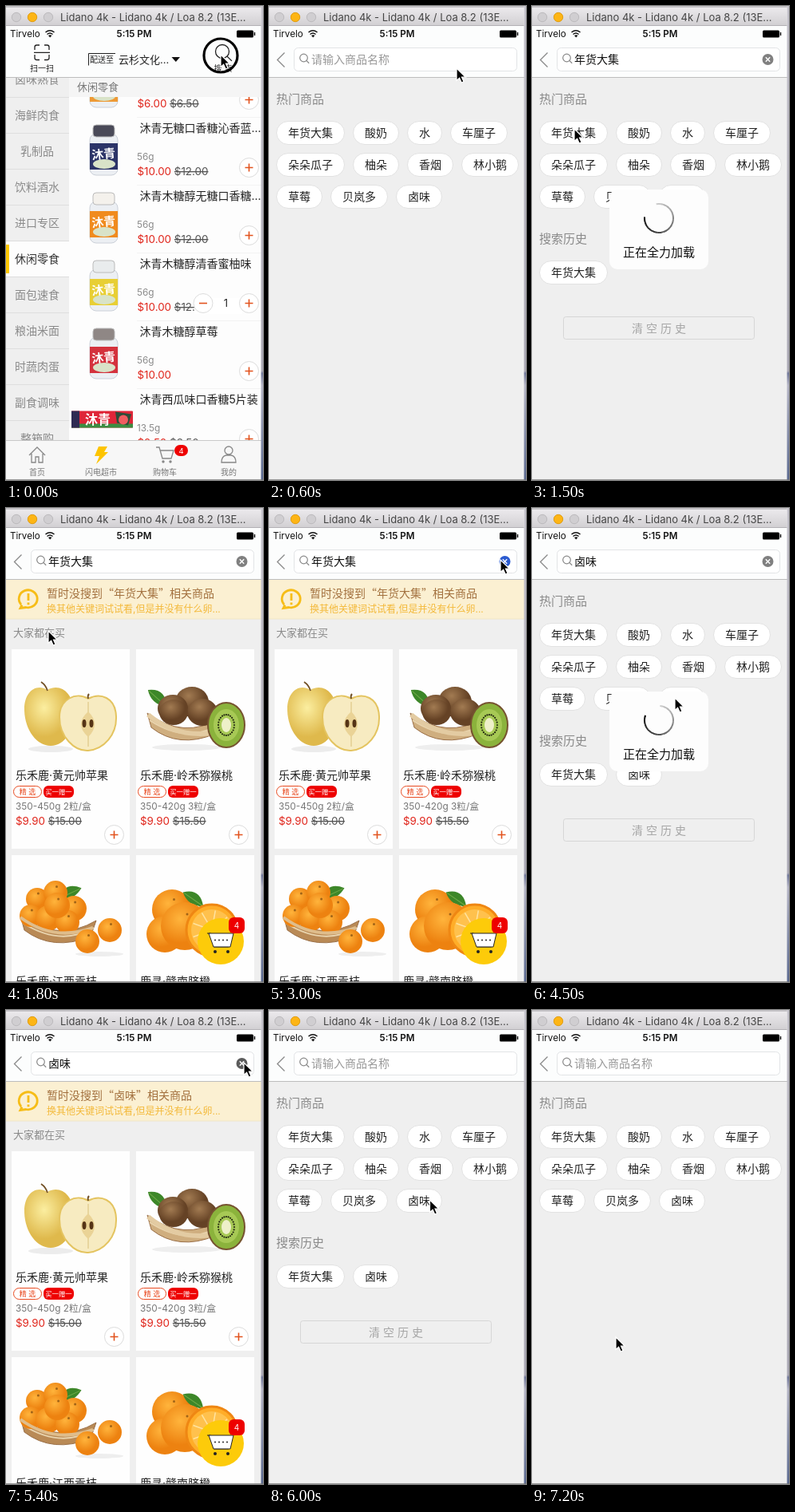
These frames come from a looping animation (322x594 px, 7500 ms). An HTML page:

```html
<!DOCTYPE html>
<html lang="zh-CN">
<head>
<meta charset="utf-8">
<style>
html, body { margin: 0; width: 100%; height: 100%; overflow: hidden; background: #efefef; }
svg { display: block; font-family: Inter, 'Noto Sans CJK SC', 'Noto Sans CJK', sans-serif; }
.cjk { font-family: 'Noto Sans CJK SC', 'Noto Sans CJK', sans-serif; }
</style>
</head>
<body>
<svg id="stage" width="322" height="594" viewBox="0 0 322 594"></svg>
<script>
const STEP = 300, STEPS = 25;
const RED = '#e0251b', GREY = '#8a8a8a';

// Drawing helpers
const rect = (x, y, w, h, fill, r = 0, more = '') =>
  `<rect x="${x}" y="${y}" width="${w}" height="${h}" rx="${r}" fill="${fill}" ${more}/>`;
const oval = (x, y, rx, ry, fill, more = '') =>
  `<ellipse cx="${x}" cy="${y}" rx="${rx}" ry="${ry}" fill="${fill}" ${more}/>`;
const disc = (x, y, r, fill, more) => oval(x, y, r, r, fill, more);
const shape = (d, fill, more = '') => `<path d="${d}" fill="${fill}" ${more}/>`;
const line = (d, color, w = 1) =>
  `<path d="${d}" fill="none" stroke="${color}" stroke-width="${w}"/>`;
const edge = color => `stroke="${color}"`;
const text = (x, y, s, size, fill = '#222', more = '') =>
  `<text x="${x}" y="${y}" font-size="${size}" fill="${fill}" ${more}>${s}</text>`;
const mid = (x, y, s, size, fill, more = '') =>
  text(x, y, s, size, fill, 'text-anchor="middle" ' + more);
const group = (x, y, body) => `<g transform="translate(${x} ${y})">${body}</g>`;
const each = (list, fn) => list.map(fn).join('');

const defs = `<defs>
  <linearGradient id="bar" x2="0" y2="1"><stop stop-color="#ebe9ec"/><stop offset="1" stop-color="#d1cfd2"/></linearGradient>
  <linearGradient id="desk" x2="0" y2="1"><stop stop-color="#c4c2cb"/><stop offset=".77" stop-color="#aaa8b4"/>
    <stop offset=".775" stop-color="#71789a"/><stop offset=".8" stop-color="#b5b5c5"/><stop offset="1" stop-color="#59688f"/></linearGradient>
  <radialGradient id="apple" cx=".4" cy=".35"><stop stop-color="#fbeea0"/><stop offset="1" stop-color="#dfb94c"/></radialGradient>
  <radialGradient id="orange" cx=".4" cy=".35"><stop stop-color="#ffb43c"/><stop offset="1" stop-color="#ed8210"/></radialGradient>
  <radialGradient id="kiwi" cx=".4" cy=".3"><stop stop-color="#a27b52"/><stop offset="1" stop-color="#654225"/></radialGradient>
</defs>`;

// Shared pieces
const price = (x, y, now, was) => text(x, y, now +
  (was ? ` <tspan fill="#555" text-decoration="line-through">${was}</tspan>` : ''), 13.4, RED);
const stepper = (x, y, plus = true) => disc(x, y, 12, '#fff', edge('#dcdcdc')) +
  line(`M${x - 5} ${y}h10` + (plus ? `M${x} ${y - 5}v10` : ''), '#e2531e', 1.6);
const lens = (x, y, r, color, w) =>
  `<circle cx="${x}" cy="${y}" r="${r}" fill="none" stroke="${color}" stroke-width="${w}"/>` +
  line(`M${x + r * .7} ${y + r * .7}l${r * .7} ${r * .7}`, color, w);

const chrome = () =>
  rect(319.5, 0, 3, 594, 'url(#desk)') + rect(0, 0, 319.5, 2, '#c4c2c6') +
  rect(0, 2, 319.5, 23, 'url(#bar)', 2) + line('M0 24.5H319.5', '#b3b1b5') +
  each([13, 33, 53], x => disc(x, 14, 5.7, x == 33 ? '#fdb515' : '#d0ced1', edge(x == 33 ? '#e09d12' : '#bcbabd'))) +
  text(68, 19, 'Lidano 4k - Lidano 4k / Loa 8.2 (13E…', 13, '#454545') +
  text(5, 39, 'Tirvelo', 11.6, '#111') +
  line('M49.5 33q5.5-4.5 11 0M51.5 35.5q3.5-2.8 7 0', '#111', 1.5) + shape('M53 37l2.2 2.4 2.2-2.4q-2.2-1.6-4.4 0', '#111') +
  mid(160.5, 39, '5:15 PM', 11.6, '#111', 'font-weight="600"') +
  rect(289, 30.5, 21, 9, '#000', 1.5) + rect(310.8, 33, 1.4, 4, '#000') +
  line('M0 593.5H322', '#777', .7);
const navBar = () => rect(0, 25, 320, 64.5, '#fcfdfd') + line('M0 89.5H320', '#bdbdbd');

const pointer = (x, y) => group(x, y,
  shape('M0 0V15.5L3.6 12.2 6.2 18 9 16.8 6.5 11.2H11.4Z', '#000', 'stroke="#fff" stroke-width="1.2"'));

// Shop page
const aisles = '卤味熟食 海鲜肉食 乳制品 饮料酒水 进口专区 休闲零食 面包速食 粮油米面 时蔬肉蛋 副食调味 整箱购'.split(' ');
const goods = [
  ['', '', '$6.00', '$6.50', '#ee9a35', '#fff'],
  ['沐青无糖口香糖沁香蓝...', '56g', '$10.00', '$12.00', '#2c3468', '#4a4a58'],
  ['沐青木糖醇无糖口香糖...', '56g', '$10.00', '$12.00', '#f08b1e', '#f4f1ec'],
  ['沐青木糖醇清香蜜柚味', '56g', '$10.00', '$12.00', '#e8cf35', '#e9eced'],
  ['沐青木糖醇草莓', '56g', '$10.00', '', '#d4323d', '#8f8785'],
  ['沐青西瓜味口香糖5片装', '13.5g', '$2.50', '$3.50', '#df2638', '']];

const bottle = (color, cap) =>
  rect(105, 12, 35, 52, '#eceff3', 8, edge('#cbd0d8')) + rect(109, 1, 27, 15, cap, 4, edge('#bbb')) +
  rect(105, 24, 35, 33, color) + oval(123, 50, 14, 6, '#d9e3c8') +
  mid(122.5, 43, '沐青', 15, '#fff', 'font-weight="800" transform="rotate(-6 122 40)"');
const pack = () => rect(82, 19, 77, 21, '#df2638', 1) + rect(82, 35, 77, 5, '#3b8d42') + rect(82, 19, 10, 21, '#2e2a52') +
  shape('M137 20l20 3-4 14-14-3z', '#2d4c38') + disc(147, 30, 6, '#f05c60') +
  mid(115, 35, '沐青', 16, '#fff', 'font-weight="800"');

function product([name, spec, now, was, color, cap], n) {
  const i = n - 1;
  return group(0, 85 * i,
    group(0, 148, cap ? bottle(color, cap) : group(0, 0.5, pack())) +
    text(167.5, 158, name, 14) + text(164, 192.5, spec, 11.8, GREY) +
    price(164.5, 212, now, was) + line('M164 224.5H320', '#f3f3f3') +
    (i == 2 ? rect(236, 196, 60, 20, '#fff') + stepper(247, 202.5, false) + mid(275.5, 207, '1', 13, '#222') : '') +
    stepper(304.5, 202.5));
}

const aisle = (name, i) => {
  const y = 92 + 45 * i, on = i == 5;
  return (on ? rect(0, y - 22, 79, 44, '#fdfdfd') + rect(0, y - 18, 4, 36, '#fdc900') : '') +
    mid(39, y + 5, name, 14, on ? '#333' : GREY) + line(`M0 ${y + 22.5}H79`, '#dedede');
};

const tabBar = () => rect(0, 544, 320, 50, '#f7f7f7') + line('M0 544.5H320', '#c9c9c9') +
  line('M29 563l10-10 10 10M32 561v11h5v-7h4v7h5v-11', '#888', 1.3) +
  shape('M116 552h11l-4 7h5l-15 15 4-10h-6z', '#fdc400') +
  line('M188 553h4l4 14h11l3-10h-17', '#888', 1.3) + disc(197, 571, 1.7, '#888') + disc(206, 571, 1.7, '#888') +
  line('M270 572q0-8 6-9h6q6 1 6 9zM284 557a5 5 0 1 1-10 0 5 5 0 1 1 10 0', '#888', 1.3) +
  rect(211, 550, 17, 14, '#ee0000', 7) + mid(219.5, 560.5, '4', 9.5, '#fff') +
  each(['首页', '闪电超市', '购物车', '我的'], (s, i) => mid(39 + 80 * i, 588, s, 10, '#777'));

const shop = () => rect(0, 90, 320, 504, '#fdfdfd') + rect(0, 90, 79, 504, '#efefef') +
  each(aisles, aisle) + each(goods, product) +
  rect(79, 90, 241, 24, '#f5f5f5') + text(89, 106, '休闲零食', 13, '#777') + navBar() +
  line('M36 55v-3.5q0-2.5 2.5-2.5H42M48 49h3.5q2.5 0 2.5 2.5V55M54 61v4q0 2.5-2.5 2.5H48M42 67.5h-3.5Q36 67.5 36 65v-4M35 58.3h20', '#222', 1.3) +
  mid(45, 82, '扫一扫', 10) +
  line('M137 59.5H103.5V74.5', '#222') + text(105, 71, '配送至', 10) +
  text(141, 71.5, '云杉文化...', 13) + shape('M207.5 64h10.5l-5.2 6z', '#111') +
  lens(271, 57, 8.5, '#222', 1.3) + mid(272, 82, '搜 索', 10) + tabBar();

// Search page
const hot = [['年货大集', '酸奶', '水', '车厘子'], ['朵朵瓜子', '柚朵', '香烟', '林小鹅'], ['草莓', '贝岚多', '卤味']];

function chips(words, y) {
  let x = 9;
  return each(words, word => {
    const w = 14 * word.length + 30, out =
      rect(x + .5, y - 14.5, w - 1, 29, '#fff', 14.5, edge('#e2e2e2')) + mid(x + w / 2, y + 5, word, 14);
    x += w + 10;
    return out;
  });
}

const searchBar = (query, clearColor) => navBar() +
  line('M19.5 58.5l-9 9 9 9', '#888', 1.3) +
  rect(31.5, 52.5, 279, 29, '#fff', 5, edge('#e2e4e6')) + lens(43.5, 65, 4.8, '#888', 1.2) +
  text(53, 72, query || '请输入商品名称', 14, query ? '#111' : '#999') +
  (query ? disc(295.5, 67, 7, clearColor) + line('M292.8 64.3l5.4 5.4m0-5.4l-5.4 5.4', '#fff', 1.4) : '');

const search = (query, past) => rect(0, 89, 320, 505, '#efefef') + searchBar(query, '#808080') +
  text(9, 122, '热门商品', 15, GREY) + each(hot, (row, i) => chips(row, 159 + 40 * i)) +
  (past.length ? text(9, 297, '搜索历史', 15, GREY) + chips(past, 334) +
    rect(39.5, 389.5, 239, 28, 'none', 3, edge('#d6d6d6')) + mid(159, 409, '清 空 历 史', 14, '#a5a5a5') : '');

function loader(head) {
  let ring = '';
  const at = a => `${159 + 18 * Math.cos(a * Math.PI / 180)} ${266 + 18 * Math.sin(a * Math.PI / 180)}`;
  for (let a = 0; a < 285; a += 7.5)
    ring += line(`M${at(head - a)}A18 18 0 0 0 ${at(head - a - 8)}`, `hsl(0 0% ${a / 285 * 82}%)`, 2);
  return rect(97, 230, 124, 100, '#fdfdfd', 10) + ring + mid(159, 314, '正在全力加载', 15, '#111');
}

// Results page
const leaf = (x, y, turn) => `<g transform="translate(${x} ${y}) rotate(${turn})">` +
  shape('M-15 0Q0-17 16 0Q0 11-15 0', '#3d8729') + line('M-13 0H14', '#70ab48') + '</g>';
const basket = (x, y, w, color) => shape(`M${x} ${y}q${w / 2} 34 ${w} 6l-7 20q${-w / 2} 19 ${12 - w}-8z`, color, edge('#9b7048')) +
  line(`M${x + 3} ${y + 9}q${w / 2} 30 ${w - 6} 6`, '#e9d4ae', 2);
const orange = (x, y, r) => disc(x, y, r, 'url(#orange)') + disc(x + r * .1, y - r * .5, 1.5, '#a06418');

const fruits = [
  () => oval(56, 302, 28, 4, '#ececec') + shape('M52 228C37 219 23 231 23 252C23 277 38 298 56 298C75 298 86 276 85 254C84 232 68 219 52 228', 'url(#apple)') +
    line('M52 229q-2-7-8-11', '#725025', 1.8) +
    shape('M103 239C88 230 67 239 67 262C67 287 86 305 103 304C123 302 139 284 138 261C137 237 118 231 103 239', '#f7ebc1', 'stroke="#e4c460" stroke-width="2"') +
    line('M103 243V299', '#d9bf7b') + line('M103 239q-1-4 1-6', '#725025', 2) +
    shape('M103 255Q85 271 103 287Q119 271 103 255', '#ead396') + oval(98, 270, 2.5, 5, '#553416') + oval(107, 270, 2.5, 5, '#553416'),
  () => group(-156, 0, leaf(189, 238, 42) + oval(226, 300, 43, 4, '#eee') + basket(177, 257, 92, '#cfae7f') +
    each([[233, 243, 19], [209, 251, 17], [246, 256, 17], [210, 256, 16]], ([x, y, r]) => oval(x, y, r + 2, r, 'url(#kiwi)')) +
    line('M178 259q35 29 80 23', '#e3cba2', 6) +
    oval(276, 272, 23, 28, '#8bb33c', 'stroke="#765330" stroke-width="2"') + oval(276, 272, 16, 20, '#a7c955') +
    each([...Array(24).keys()], i => disc(276 + 10 * Math.cos(i * .262), 272 + 13 * Math.sin(i * .262), 1.1, '#252a12')) +
    oval(276, 272, 6, 9, '#eef0c9')),
  () => group(0, -258, leaf(80, 483, -25) + basket(18, 511, 95, '#b98a56') +
    each([[39, 490, 14], [62, 482, 15], [31, 511, 14], [85, 502, 16], [53, 514, 16], [77, 519, 15], [64, 498, 16]], o => orange(...o)) +
    line('M18 513q42 31 91 13', '#dfbd8c', 4) + oval(117, 559, 30, 3, '#eee') + orange(130, 529, 15) + orange(102, 543, 15)),
  () => group(-156, -258, orange(208, 503, 25) + orange(199, 534, 23) + leaf(234, 490, 35) + orange(224, 524, 30) +
    disc(258, 529, 32, '#ffad28', 'stroke="#ef8713" stroke-width="3"') + disc(258, 529, 26, '#ffc14d') +
    each([...Array(9).keys()], i => line(`M258 529l${25 * Math.cos(i * .698)} ${25 * Math.sin(i * .698)}`, '#ffe3a0', 1.5)))];

const cards = [
  ['乐禾鹿·黄元帅苹果', '350-450g 2粒/盒', '$15.00'], ['乐禾鹿·岭禾猕猴桃', '350-420g 3粒/盒', '$15.50'],
  ['乐禾鹿·江西贡桔', '', ''], ['鹿寻·赣南脐橙', '', '']];

const card = ([name, spec, was], i) => group(156 * (i % 2), 258 * (i >> 1),
  rect(7, 177, 148, 250, '#fefefe') + fruits[i]() + text(12, 340, name, 14) +
  rect(9.5, 348.5, 35, 14, '#fff', 7, edge('#e8491f')) + mid(27, 359, '精 选', 9, '#e8491f') +
  rect(47, 348, 38, 15, '#ee0000', 6) + mid(66, 358.8, '买一赠一', 8.4, '#fff') +
  text(12, 378, spec, 11.8, '#777') + price(12, 397, '$9.90', was) + stepper(135.5, 409.5));

const cartButton = () => disc(269, 543, 29, '#fdcb0a') +
  line('M252 533h4l5 17h18', '#222', 1.2) + shape('M254 533h31l-4 17h-21z', '#fff', edge('#222')) +
  each([0, 1, 2, 3], i => disc(262 + i * 5, 541.5, 1, '#222')) + disc(262, 556, 2, '#222') + disc(278, 556, 2, '#222') +
  rect(279, 513, 20, 20, '#ee0000', 6) + mid(289, 527, '4', 10, '#fff');

const results = (query, clearColor) => rect(0, 89, 320, 505, '#efefef') + each(cards, card) + cartButton() +
  searchBar(query, clearColor) + rect(0, 90, 320, 49, '#fbf0d2') + line('M0 139H320', '#f1e6c5') +
  line('M19 121a11.5 11 0 1 1 6 3.5l-7 1 2-4', '#f6bd18', 2.8) +
  line('M28 107v9m0 2.5v2.7', '#f6bd18', 2.8) +
  text(51, 112, `暂时没搜到“${query}”相关商品`, 14, '#a3713f', 'class="cjk"') +
  text(51, 131, '换其他关键词试试看,但是并没有什么卵...', 12, '#f3b93a') +
  text(9, 161, '大家都在买', 13, GREY);

// Timeline: [step, x, y] for the pointer
const path = [[0, 269, 61], [2, 235, 78], [4, 53, 154], [8, 53, 154], [10, 290, 65], [11, 290, 65],
  [14, 179, 238], [16, 179, 238], [18, 298, 66], [19, 298, 66], [21, 105, 410], [25, 105, 410]];

function pointerAt(s) {
  const i = path.findIndex(p => p[0] > s), [a, ax, ay] = path[i - 1], [b, bx, by] = path[i];
  const k = (s - a) / (b - a);
  return pointer(ax + (bx - ax) * k, ay + (by - ay) * k);
}

function page(s) {
  const first = '年货大集', second = '卤味', both = [first, second];
  const spin = loader(185 + 37.5 * (s - 5));
  if (s == 0) return shop() + disc(269, 62, 21, 'none', 'stroke="#000" stroke-width="3.2"');
  if (s == 1) return shop() + group(24, 0, search('', []));
  if (s < 5) return search('', []);
  if (s == 5) return search(first, [first]) + spin;
  if (s < 11) return results(first, s == 10 ? '#2b5bd0' : '#808080');
  if (s < 15) return search('', [first]);
  if (s == 15) return search(second, both) + spin;
  if (s < 19) return results(second, s == 18 ? '#5c5c5c' : '#808080');
  return search('', s < 23 ? both : []);
}

const stage = document.getElementById('stage'), start = performance.now();
let shown = -1;
function tick() {
  const s = Math.floor((performance.now() - start) / STEP) % STEPS;
  if (s != shown) {
    shown = s;
    stage.innerHTML = defs + page(s) + chrome() + pointerAt(s);
  }
  requestAnimationFrame(tick);
}
tick();
</script>
</body>
</html>
```
